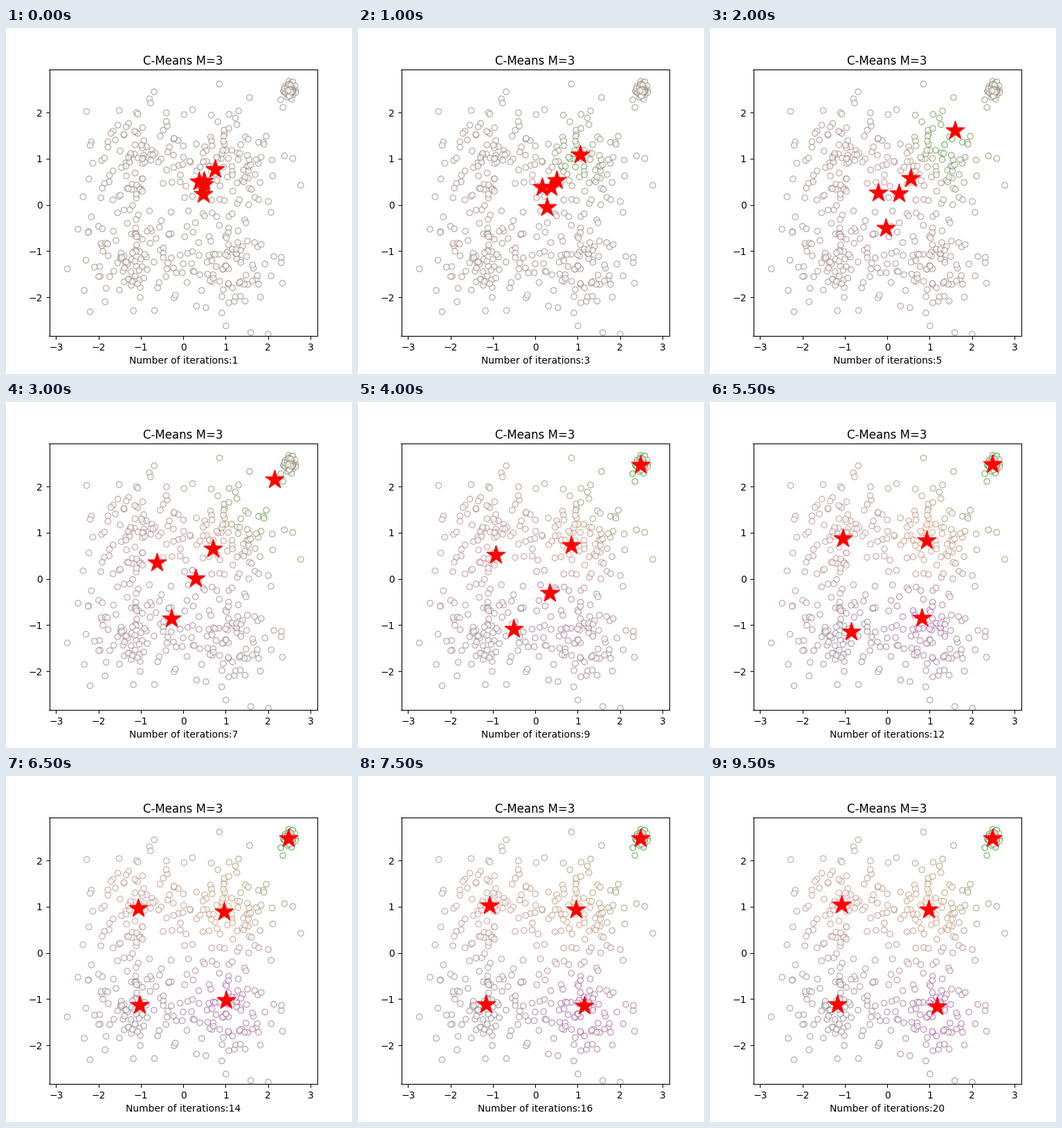
Recreate the animation shown at these times as a matplotlib script. Size 500 by 500 pixels, loop 10 s.

```python
import numpy as np
import matplotlib.pyplot as plt
from matplotlib.animation import FuncAnimation

STEPS = 20
INTERVAL = 500
ALPHA = 0.65
ORIGIN = np.array([256.2, 255.7])   # stage pixel of the data origin
SCALE = np.array([61.25, -66.75])   # stage pixels per data unit

# Cluster colours: green, orange, brown, purple, grey.
COLORS = np.array([
    (16, 166, 16), (245, 170, 115), (215, 158, 160),
    (165, 70, 195), (130, 130, 145),
]) / 255
BLEND = COLORS.mean(axis=0)

# Each centre glides through a few key points and then rests.
KEY_STEPS = np.array([1, 5, 9, 12, 17])
PATHS = np.array([
    [(.74, .77), (1.60, 1.62), (2.48, 2.47), (2.48, 2.48), (2.48, 2.48)],
    [(.49, .52), (.55, .58), (.85, .73), (.93, .83), (.97, .94)],
    [(.37, .50), (-.22, .27), (-.93, .52), (-1.04, .88), (-1.08, 1.04)],
    [(.48, .44), (.27, .25), (.34, -.31), (.81, -.85), (1.18, -1.16)],
    [(.47, .23), (-.04, -.50), (-.51, -1.09), (-.85, -1.14), (-1.18, -1.11)],
])


def path_slopes():
    """Harmonic-mean slopes, so the paths never overshoot."""
    rate = np.diff(PATHS, axis=1) / np.diff(KEY_STEPS)[:, None]
    before, after = rate[:, :-1], rate[:, 1:]
    same_way = before * after > 0
    total = np.where(same_way, before + after, 1)
    slopes = np.zeros_like(PATHS)
    slopes[:, 1:-1] = np.where(same_way, 2 * before * after / total, 0)
    return slopes


SLOPES = path_slopes()


def centers_at(step):
    step = min(step, KEY_STEPS[-1])
    i = min(np.searchsorted(KEY_STEPS, step, side="right"), len(KEY_STEPS) - 1) - 1
    gap = KEY_STEPS[i + 1] - KEY_STEPS[i]
    t = (step - KEY_STEPS[i]) / gap
    ease = t * t * (3 - 2 * t)
    return (PATHS[:, i] * (1 - ease) + PATHS[:, i + 1] * ease
            + t * (1 - t) ** 2 * gap * SLOPES[:, i]
            - t * t * (1 - t) * gap * SLOPES[:, i + 1])


def make_points():
    """Four wide clusters, and a tight one whose core keeps its colour."""
    rng = np.random.default_rng(7)
    corners = [(x, y) for x in (-1.1, 1.1) for y in (-1.05, 1.05)]
    wide = [rng.normal(c, (0.65, 0.62), (105, 2)) for c in corners]
    tight = rng.normal((2.5, 2.49), 0.075, (45, 2))
    core = rng.normal((2.51, 2.49), 0.06, (45, 2))
    return np.vstack(wide + [tight]), core


def point_colors(step):
    """Blend the cluster colours by the memberships (M=3) of the last step."""
    if step == 1:
        return np.tile(BLEND, (len(points), 1))
    gaps = points[:, None] - centers_at(step - 1)
    weight = 1 / np.maximum(np.linalg.norm(gaps, axis=2), 1e-6)
    weight /= weight.sum(axis=1, keepdims=True)
    return weight @ COLORS


points, core = make_points()
fig, ax = plt.subplots(figsize=(5, 5), dpi=100)
ax.set_xlim((np.array([62.5, 450]) - ORIGIN[0]) / SCALE[0])
ax.set_ylim((np.array([445, 60]) - ORIGIN[1]) / SCALE[1])
ax.set_title("C-Means M=3", pad=5.3)
label = ax.set_xlabel("")

ring = dict(s=36, facecolors="white", linewidths=1, alpha=ALPHA)
dots = ax.scatter(*points.T, edgecolors=point_colors(1), **ring)
ax.scatter(*core.T, edgecolors=[BLEND], **ring)
stars = ax.scatter(*centers_at(1).T, s=400, c="red", marker="*", zorder=3)


def update(frame):
    step = frame + 1
    dots.set_edgecolors(point_colors(step))
    stars.set_offsets(centers_at(step))
    label.set_text(f"Number of iterations:{step}")
    return dots, stars, label


anim = FuncAnimation(fig, update, frames=STEPS, interval=INTERVAL,
                     repeat=True, repeat_delay=0)
plt.show()
```
